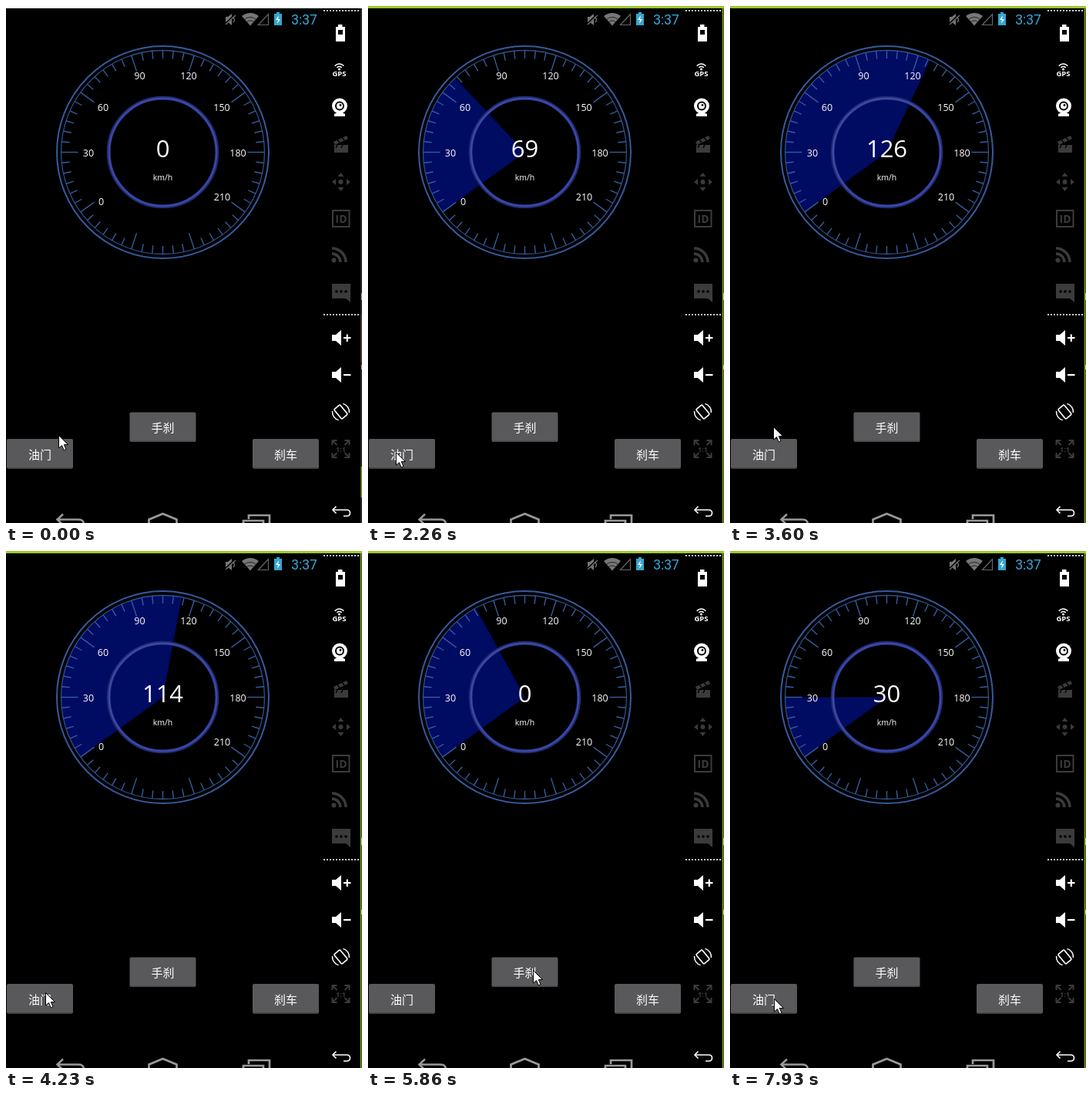
These frames come from a looping animation (462 px wide and 670 px high, 8000 ms). An HTML page with a canvas:

```html
<!DOCTYPE html>
<html lang="zh">
<head>
<meta charset="utf-8">
<title>Speedometer</title>
<style>
html, body { margin: 0; width: 100%; height: 100%; overflow: hidden; background: #000; }
canvas { display: block; }
</style>
</head>
<body>
<canvas id="stage" width="462" height="670"></canvas>
<script>
const ctx = document.getElementById('stage').getContext('2d');
const TAU = Math.PI * 2, LOOP = 8000;
const CX = 203.5, CY = 189.5;
const rad = deg => deg * Math.PI / 180;

// The screen refreshes in bursts: [first, last, count]
const refreshes = [
  [90, 180, 2], [360, 810, 6], [960, 960, 1], [1120, 1120, 1], [1300, 1390, 2],
  [1540, 1630, 2], [1780, 1870, 2], [2030, 2110, 2], [2260, 2500, 4], [2680, 2950, 4],
  [3100, 3600, 7], [3680, 3830, 3], [3920, 4650, 10], [4740, 4910, 3], [5000, 5540, 7],
  [5600, 5940, 5], [6650, 7160, 7], [7570, 7930, 5]
].flatMap(([a, b, n]) => Array.from({ length: n }, (_, i) => a + (b - a) * i / Math.max(1, n - 1)));

const speedKeys = [
  [960, 0], [1120, 6], [1390, 21], [1870, 51], [2110, 66], [2260, 69], [2500, 90],
  [2950, 111], [3390, 130], [3600, 126], [4910, 98], [5540, 86], [5855, 81], [5940, 0],
  [7480, 0], [7930, 30]
];
const cursorKeys = [
  [0, 68, 556], [90, 99, 556], [180, 83, 557], [360, 78, 560], [810, 36, 578],
  [3017, 36, 578], [3200, 30, 574], [3600, 56, 545], [3830, 60, 556], [4300, 48, 579],
  [4910, 48, 579], [5540, 214, 543], [6560, 214, 543], [7160, 57, 580]
];

function track(keys, t) {
  const next = keys.findIndex(k => k[0] > t);
  if (next < 0) return keys[keys.length - 1].slice(1);
  if (next === 0) return keys[0].slice(1);
  const a = keys[next - 1], b = keys[next], p = (t - a[0]) / (b[0] - a[0]);
  return a.slice(1).map((v, i) => v + (b[i + 1] - v) * p);
}

function rect(x, y, w, h, color) {
  ctx.fillStyle = color;
  ctx.fillRect(x, y, w, h);
}
function fill(d, color) {
  ctx.fillStyle = color;
  ctx.fill(new Path2D(d));
}
function stroke(d, color, width = 2) {
  ctx.strokeStyle = color;
  ctx.lineWidth = width;
  ctx.stroke(new Path2D(d));
}
function disc(x, y, r, color) {
  ctx.beginPath();
  ctx.arc(x, y, r, 0, TAU);
  ctx.fillStyle = color;
  ctx.fill();
}
function ring(x, y, r, color, width, from = 0, to = 360) {
  ctx.beginPath();
  ctx.arc(x, y, r, rad(from), rad(to));
  ctx.strokeStyle = color;
  ctx.lineWidth = width;
  ctx.stroke();
}
function text(s, x, y, font, color = '#fff') {
  ctx.font = font;
  ctx.fillStyle = color;
  ctx.textAlign = 'center';
  ctx.fillText(s, x, y);
}

function drawGauge(speed, shown) {
  if (speed > 0) {
    ctx.beginPath();
    ctx.moveTo(CX, CY);
    ctx.arc(CX, CY, 132, rad(144), rad(144 + speed * 1.2));
    ctx.fillStyle = '#000b62';
    ctx.fill();
  }
  ring(CX, CY, 137.5, '#365a9c', 2);
  ring(CX, CY, 132, '#2f5088', 1.3);
  for (let i = 0; i < 60; i++) {
    const a = rad(144 + i * 6), inner = i % 6 ? 121.5 : 110;
    ctx.beginPath();
    ctx.moveTo(CX + Math.cos(a) * inner, CY + Math.sin(a) * inner);
    ctx.lineTo(CX + Math.cos(a) * 132, CY + Math.sin(a) * 132);
    ctx.strokeStyle = '#355b9b';
    ctx.lineWidth = 1.4;
    ctx.stroke();
  }
  ring(CX, CY, 70.3, '#212b6c', 5);
  ring(CX, CY, 69.7, '#3b48ac', 2.4);
  [[123.5, 253], [107, 190], [126, 131], [173.5, 90.5], [237, 90.5], [280, 131], [301, 190], [280.5, 247]]
    .forEach(([x, y], i) => text(i * 30, x, y + 4.7, '12.5px "Open Sans", sans-serif'));
  text(shown, CX, 196, '31px "Open Sans", sans-serif');
  text('km/h', CX, 226, '10.5px "Open Sans", sans-serif');
}

function drawStatusBar() {
  const gray = '#777';
  fill('M285 14h3l5-4v15l-5-4h-3z', gray);
  stroke('M284 24L298 11', '#000', 3);
  stroke('M285 24L298 12M295 15q3 3 0 6', gray, 1.3);
  fill('M306 13Q317 5 328 13L317 25.5z', '#777');
  ring(317, 26, 11.5, '#222', 1, 225, 315);
  ring(317, 26, 7, '#222', 1, 225, 315);
  stroke('M340.5 10.5V24.5H327.5z', '#666', 1.2);
  fill('M351 8h4v2h3v15h-10V10h3z', '#36a5d0');
  fill('M354 12l-4 6h3l-1 5 4-6h-3z', '#fff');
  text('3:37', 387, 23.5, '17.5px Roboto, sans-serif', '#33a9d8');
}

function drawButton(label, x, y) {
  ctx.beginPath();
  ctx.roundRect(x, y, 86, 38.5, 2);
  ctx.fillStyle = '#59595b';
  ctx.fill();
  rect(x + 1, y + 37, 84, 1.5, '#464648');
  text(label, x + 43, y + 25.5, '15px "Noto Sans CJK SC", "Noto Sans CJK", sans-serif');
}

function drawNavigation() {
  const gray = '#999';
  stroke('M74 658.5L66.5 665.5L74 672.5M67 665.5H94Q101 665.5 101 672', gray, 2.5);
  stroke('M185.5 672V665.5L203.5 658L221.5 665.5V672', gray, 2.7);
  stroke('M315 665V660H342V672M308 672V667H334V672', gray, 2.7);
}

function drawSpeaker(y) {
  fill(`M423 ${y - 4}h5l7-6v20l-7-6h-5z`, '#fff');
  rect(438, y - 1, 9.5, 2.2, '#fff');
}

function drawSidePanel() {
  const dim = '#3b3b3b', bold = 'bold 9.5px "Open Sans", sans-serif';
  for (let x = 412; x < 459; x += 4) {
    rect(x, 5, 2, 2, '#ccc');
    rect(x, 399, 2, 2, '#ccc');
  }
  fill('M431 24h5.5v3h3.5v19h-12V27h3z', '#fff');
  rect(431, 31, 6, 6, '#000');

  disc(432.5, 82, 1.5, '#fff');
  ring(432.5, 82.5, 4, '#fff', 1.6, 220, 320);
  ring(432.5, 82.5, 7.5, '#fff', 1.6, 220, 320);
  text('GPS', 432.5, 91.3, bold);

  disc(433, 129.5, 10, '#fff');
  ring(433, 129.5, 5, '#000', 2);
  disc(434, 128.5, 1.4, '#000');
  fill('M430 138h6l4 2v3h-14v-3z', '#fff');

  fill('M425 176L442 168L444 172L427 180zM426 180H444V190H426z', dim);
  stroke('M430 173l3 4M436 170l3 4M430 180l-2 4M437 180l-2 4', '#000', 1.4);

  disc(434.5, 228, 3, dim);
  fill('M434.5 216l4 5h-8zM434.5 240l4-5h-8zM423 228l5-4v8zM447 228l-5-4v8z', dim);

  ctx.strokeStyle = dim;
  ctx.lineWidth = 2;
  ctx.strokeRect(424, 265, 21.5, 21);
  text('ID', 435, 281, 'bold 14px "Open Sans", sans-serif', dim);

  disc(425.5, 329.5, 3, dim);
  ring(423, 332, 11, dim, 3.5, 270, 360);
  ring(423, 332, 18, dim, 3.5, 270, 360);

  fill('M423 360H447V384L441 379H423z', dim);
  for (let i = 0; i < 3; i++) disc(429 + i * 6, 370, 1.8, '#000');

  drawSpeaker(430);
  rect(441.7, 425.5, 2.2, 9.5, '#fff');
  drawSpeaker(478);

  ctx.save();
  ctx.translate(434.5, 526);
  ctx.rotate(rad(-40));
  ctx.strokeStyle = '#fff';
  ctx.lineWidth = 1.7;
  ctx.beginPath();
  ctx.roundRect(-5, -8, 10, 16, 1.5);
  ctx.stroke();
  ctx.restore();
  ring(434.5, 526, 11, '#fff', 1.5, 285, 365);
  ring(434.5, 526, 11, '#fff', 1.5, 105, 185);

  for (const sx of [-1, 1]) for (const sy of [-1, 1]) {
    const x = 434.5 + sx * 11, y = 574 + sy * 11;
    stroke(`M${x - sx * 6} ${y}H${x}V${y - sy * 6}M${x} ${y}l${-sx * 6} ${-sy * 6}`, dim, 2);
  }
  text('1:1', 434.5, 577.5, 'bold 9px "Open Sans", sans-serif', dim);

  stroke('M428.5 648.5L424 653L428.5 657.5M424.5 653H442Q446.5 653 446.5 657T442 661H438', '#fff', 1.6);
}

function drawSurround(active) {
  const frame = active ? '#9bc832' : '#fff';
  rect(0, 0, 462, 3, frame);
  if (active) {
    rect(460, 0, 1.3, 670, frame);
  } else {
    rect(460, 3, 2, 667, '#2c2c2c');
    rect(460.5, 400, 1.5, 62, '#5a4030');
    rect(460.5, 597, 1.5, 40, '#6d9a2c');
  }
  rect(461, 372, 1, 9, '#aaa');
  rect(461, 465, 1, 6, '#aaa');
}

function drawCursor(x, y) {
  ctx.save();
  ctx.translate(x + 0.5, y + 0.5);
  const arrow = 'M0 0V16.5L4 13L6.7 19.3L9.5 18L6.8 12H12z';
  fill(arrow, '#fff');
  stroke(arrow, '#000', 1);
  ctx.restore();
}

function draw(now) {
  const time = now % LOOP;
  const t = refreshes.filter(r => r <= time).pop() || 0;
  const speed = track(speedKeys, t)[0];
  const handbrake = t >= 5850 && t < 5940;
  rect(0, 0, 462, 670, '#000');
  drawGauge(speed, handbrake ? 0 : Math.round(speed));
  drawStatusBar();
  drawButton('油门', 1, 561);
  drawButton('手刹', 160.5, 526.5);
  drawButton('刹车', 320, 561);
  drawNavigation();
  drawSidePanel();
  drawSurround(t >= 960);
  drawCursor(...track(cursorKeys, t).map(Math.round));
  requestAnimationFrame(() => draw(performance.now() - start));
}
const start = performance.now();
draw(0);
</script>
</body>
</html>
```
